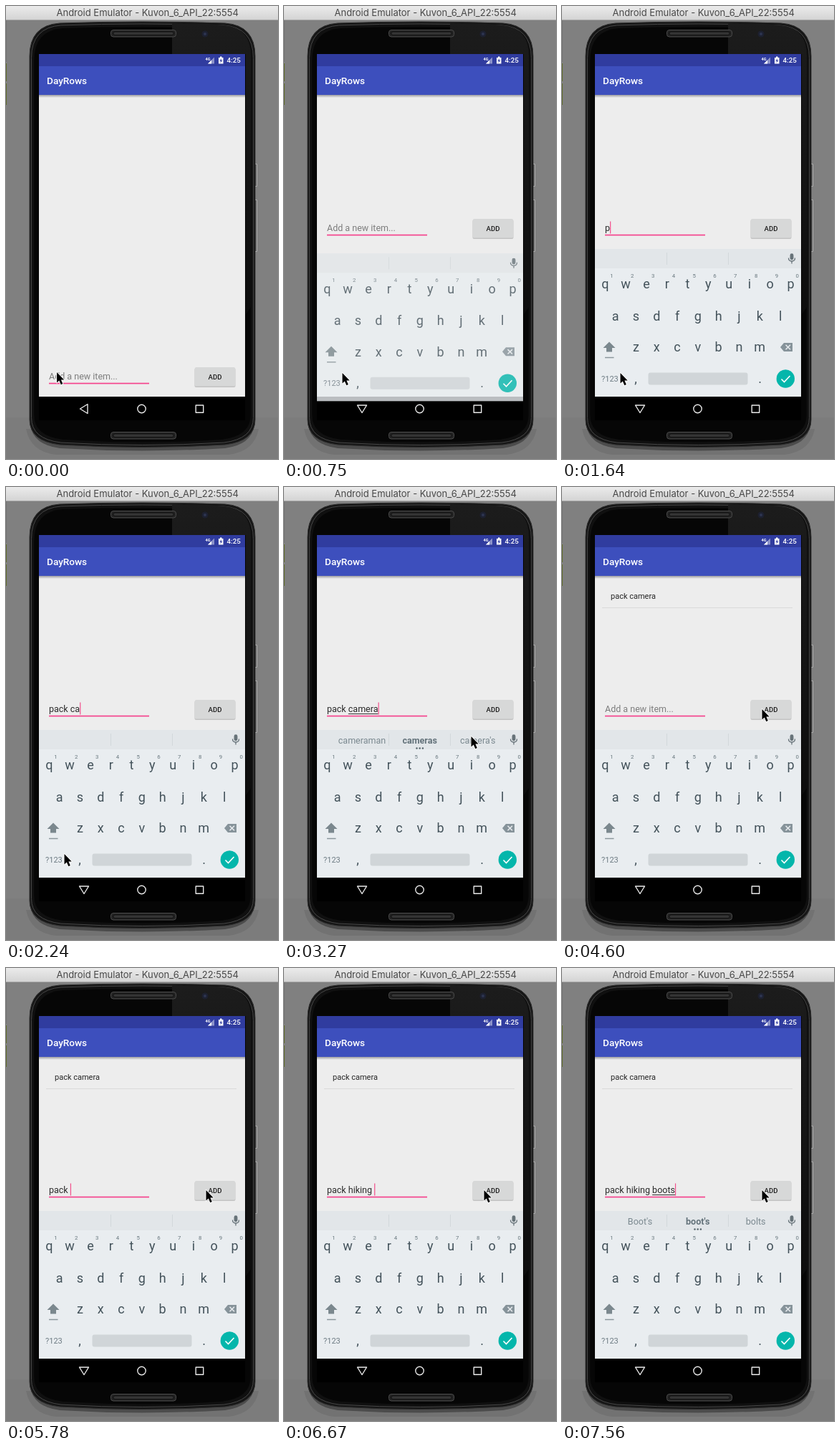
Animation of 380 by 632 pixels, one loop 8000 ms. Source, as an HTML page:

```html
<!DOCTYPE html>
<html lang="en">
<head>
<meta charset="utf-8">
<title>To-do list demo</title>
<style>
html, body { margin: 0; width: 100%; height: 100%; overflow: hidden; background: #808080; }
svg { display: block; width: 380px; height: 632px; font-family: Roboto, sans-serif; }
.window { font: 13px Inter, sans-serif; fill: #484848; }
.title { font-size: 13.6px; font-weight: 500; fill: #fff; }
.field { font-size: 12.5px; fill: #2b2b2b; }
.hint { fill: #7e7e7e; }
.add { font-size: 9.6px; font-weight: 500; fill: #1d1d1d; text-anchor: middle; }
.item { font-size: 11px; fill: #262626; }
.key { font-size: 18px; fill: #43525a; text-anchor: middle; }
.digit { font-size: 7.8px; fill: #66757c; text-anchor: middle; }
.word { font-size: 12.5px; fill: #7a888f; text-anchor: middle; }
.best { font-weight: 700; fill: #63727a; }
.nav { fill: none; stroke: #e8e8e8; stroke-width: 1.4; stroke-linejoin: round; }
.inset { transform-box: fill-box; transform-origin: center; }
</style>
</head>
<body>
<svg viewBox="0 0 380 632">
  <defs>
    <linearGradient id="bar" x2="0" y2="1">
      <stop stop-color="#ebebeb"/><stop offset="1" stop-color="#d4d4d4"/>
    </linearGradient>
    <linearGradient id="drop" x2="0" y2="1">
      <stop stop-color="#9c9ca0"/><stop offset="1" stop-color="#ededed"/>
    </linearGradient>
    <linearGradient id="gloss" x2="0" y2="1">
      <stop stop-color="#1c1c1c"/><stop offset="1" stop-color="#0d0d0d"/>
    </linearGradient>
    <path id="body" d="M33 70Q33 27 75 24Q190 20 306 24Q348 27 348 70V577Q348 607 306 612Q190 619 75 612Q33 607 33 577Z"/>
    <g id="speaker">
      <rect x="146.5" y="33.500" width="91" height="9.500" rx="3.500" fill="#222" stroke="#4b4b4b"/>
      <rect x="150" y="36" width="84" height="4.500" rx="2" fill="#343434" stroke="#111"/>
    </g>
  </defs>

  <!-- desktop and device -->
  <rect width="380" height="632" fill="#808080"/>
  <path d="M0 574H380V632H0Z" fill="#7c7c7c"/>
  <path d="M28 590Q34 622 70 626H310Q347 622 353 590Z" fill="#727272"/>
  <path d="M34 585Q38 612 75 617Q190 624 306 617Q343 612 347 585Z" fill="#4c4c4c"/>
  <path d="M.5 19V78" stroke="#707070"/>
  <path d="M.5 80V105M.5 108V138" stroke="#5d6a2a"/>
  <rect width="380" height="19" fill="url(#bar)"/>
  <path d="M0 19.500H380" stroke="#a5a5a5"/>
  <text class="window" x="70.500" y="14">Android Emulator - Kuvon_6_API_22:5554</text>
  <path d="M348 220.500H350.500V251.500H348M348 270.500H350.500V342.500H348" fill="#5a5a5a" stroke="#b0b0b0"/>
  <use href="#body" fill="#161616" stroke="#2b2b2b"/>
  <use href="#body" class="inset" fill="#101010" stroke="#484848" transform="scale(.984 .99)"/>
  <use href="#body" class="inset" fill="#060606" transform="scale(.96 .976)"/>
  <path d="M232 25Q280 24 306 27Q342 31 342 70V420L335 430V67H232Z" fill="url(#gloss)"/>
  <use href="#speaker"/>
  <use href="#speaker" y="561"/>
  <circle cx="278" cy="39" r="4.500" fill="#1d2130"/>
  <circle cx="278" cy="39" r="2" fill="#2d3450"/>

  <!-- app -->
  <rect x="46" y="67" width="288" height="511" fill="#000"/>
  <rect x="46" y="67" width="288" height="478" fill="#ededed"/>
  <rect x="46" y="67" width="288" height="17" fill="#303c9f"/>
  <rect x="46" y="84" width="288" height="40" fill="#3d4fbd"/>
  <rect x="46" y="124" width="288" height="4" fill="url(#drop)"/>
  <g fill="#fff">
    <text x="278.500" y="76" font-size="5.500" font-weight="700">4G</text>
    <path d="M282 80.500L291 71.500V80.500Z" opacity=".45"/>
    <path d="M282 80.500L287 75.500V80.500Z"/>
    <path d="M297 72H299V70.500H301.500V72H303.500V80.500H297Z"/>
    <path d="M301.200 73L298.300 76.700H300.100L299.500 79.500L302.400 75.700H300.600Z" fill="#303c9f"/>
    <text x="308.500" y="79.300" font-size="9.800" font-weight="500">4:25</text>
  </g>
  <text class="title" x="57" y="109">DayRows</text>
  <g id="item">
    <text class="item" x="68" y="156">pack camera</text>
    <path d="M56 168.500H322" stroke="#d9d9d9"/>
  </g>
  <g id="entry">
    <text id="field" class="field" x="60" y="521"></text>
    <path id="underline" stroke="#333" stroke-width="1"/>
    <rect id="caret" y="507.500" width="1.200" height="17" fill="#f2508c"/>
    <rect x="60" y="525.700" width="140" height="1.700" fill="#f4438c"/>
    <rect x="263.500" y="505" width="57" height="27" rx="2" fill="#c3c3c3"/>
    <rect id="button" x="264" y="504" width="56" height="26.500" rx="1.500"/>
    <text class="add" x="292" y="521">ADD</text>
  </g>

  <g class="nav">
    <path id="back"/>
    <circle cx="189.500" cy="562" r="5.700"/>
    <rect x="265.200" y="557" width="10.500" height="10.300"/>
  </g>

  <!-- soft keyboard -->
  <g id="keyboard">
    <rect x="46" y="339" width="288" height="206" fill="#e9edf0"/>
    <rect x="46" y="339" width="288" height="27" fill="#e2e6e9"/>
    <path d="M146.500 344V361M232.500 344V361" stroke="#d2d8db"/>
    <g fill="none" stroke="#667278" stroke-width="1.300">
      <rect x="319.200" y="346" width="3.600" height="7.500" rx="1.800" fill="#667278"/>
      <path d="M316.500 351.500Q316.500 356 321 356T325.500 351.500M321 356V359.500"/>
    </g>
    <g id="words"></g>
    <g id="dots" fill="#55636a">
      <circle cx="185.500" cy="364.500" r="1.200"/><circle cx="189.700" cy="364.500" r="1.200"/><circle cx="193.900" cy="364.500" r="1.200"/>
    </g>
    <g id="keys"></g>
    <path d="M66 468.500L74.500 477H70V482.500H62V477H57.500Z" fill="#7b888e"/>
    <path d="M60 490.500H72.500" stroke="#8b979c" stroke-width="1.500"/>
    <path d="M305 476L310 470H322V482H310Z" fill="#86939a"/>
    <path d="M312.500 472.800L319 479.200M319 472.800L312.500 479.200" stroke="#e9edf0" stroke-width="1.500"/>
    <text x="55" y="523.800" font-size="11" fill="#6e7c84">?123</text>
    <rect x="120.500" y="511.500" width="139" height="17" rx="3" fill="#d0d5d8"/>
    <circle cx="312.300" cy="520" r="12.700" fill="#04b6ab"/>
    <path d="M306.500 520.500L310.500 524.500L318.500 516" fill="none" stroke="#fff" stroke-width="1.600"/>
  </g>

  <path id="pointer" d="M0 0V14.500L3.300 11.500L5.800 17.200L8.300 16.100L5.900 10.600H10.200Z" fill="#000" stroke="#fff" stroke-width="1.800" stroke-linejoin="round" paint-order="stroke"/>
</svg>
<script>
const LOOP = 8000;
const $ = id => document.getElementById(id);

function addText(parent, cls, x, y, content) {
  const node = document.createElementNS("http://www.w3.org/2000/svg", "text");
  node.setAttribute("class", cls);
  node.setAttribute("x", x);
  node.setAttribute("y", y);
  node.textContent = content;
  parent.append(node);
  return node;
}

const PITCH = 28.8;
[["qwertyuiop", 60.3, 394.3], ["asdfghjkl", 74.7, 438.6], ["zxcvbnm", 103.4, 482.4]].forEach(([row, x, y]) =>
  [...row].forEach((letter, i) => addText($("keys"), "key", x + i * PITCH, y, letter)));
[..."1234567890"].forEach((digit, i) => addText($("keys"), "digit", 69.5 + i * PITCH, 378.5, digit));
addText($("keys"), "key", 103, 526, ",");
addText($("keys"), "key", 276.5, 526, ".");

const words = [109, 189.7, 270.7].map((x, i) => addText($("words"), i === 1 ? "word best" : "word", x, 357.5, ""));

const IDLE = {
  pointer: [71, 511], open: false, lift: 0, fade: 0, text: "", caret: false,
  words: [], item: false, pressed: false
};
const PACK = ["Pack", "pack", "packed"];
const typed = (text, suggestions = []) => ({ text, caret: true, words: suggestions });
const at = (x, y) => ({ pointer: [x, y] });

// Each step changes part of the state and holds until the next one.
const STEPS = [
  [0, {}],
  [150, { ...at(81.5, 512), caret: true }],
  [600, { open: true, lift: 17, fade: .4, caret: false }],
  [750, { lift: 6.3, fade: .8 }],
  [900, { lift: 1, fade: .97 }],
  [1050, { lift: 0, fade: 1, caret: true }],
  [1640, typed("p")],
  [1790, typed("pac")],
  [1940, typed("pack", PACK)],
  [2090, typed("pack ")],
  [2240, typed("pack ca")],
  [2390, typed("pack cam")],
  [2530, typed("pack came")],
  [2680, typed("pack camera")],
  [2820, { ...typed("pack camera", ["cameraman", "cameras", "camera's"]), ...at(88, 505) }],
  [2970, at(135, 455)],
  [3120, at(215, 388)],
  [3270, at(261.5, 348)],
  [3420, at(281, 318)],
  [3560, at(290, 297)],
  [3710, at(284, 305)],
  [3860, at(279.5, 310)],
  [4010, { pressed: true }],
  [4160, { ...typed(""), item: true }],
  [4450, { pressed: false }],
  [4600, { caret: false }],
  [5050, typed("p")],
  [5190, typed("pac")],
  [5340, typed("pack", PACK)],
  [5640, typed("pack ", PACK)],
  [5780, typed("pack ")],
  [5930, typed("pack h")],
  [6080, typed("pack hi")],
  [6230, typed("pack hik")],
  [6370, typed("pack hikin")],
  [6520, typed("pack hiking", ["Hiking", "hiking", "hikings"])],
  [6670, typed("pack hiking ")],
  [6820, typed("pack hiking b")],
  [6970, typed("pack hiking bo")],
  [7120, typed("pack hiking boo")],
  [7260, typed("pack hiking boot")],
  [7410, typed("pack hiking boots")],
  [7560, typed("pack hiking boots", ["Boot's", "boot's", "bolts"])]
];
let last = IDLE;
const states = STEPS.map(([time, change]) => ({ time, state: last = { ...last, ...change } }));

const show = (id, visible) => $(id).setAttribute("visibility", visible ? "visible" : "hidden");

function measure(text) {
  $("field").textContent = text.replace(/ /g, "\u00a0");
  return text ? $("field").getComputedTextLength() : 0;
}

function render(s) {
  const wordStart = measure(s.text.slice(0, s.text.lastIndexOf(" ") + 1));
  const end = measure(s.text);
  if (!s.text) $("field").textContent = "Add a new item...";
  $("field").setAttribute("class", s.text ? "field" : "field hint");

  const composing = s.words.length > 0;
  $("underline").setAttribute("d", composing && wordStart < end ? `M${60 + wordStart} 523.5H${60 + end}` : "");
  $("caret").setAttribute("x", 60 + end);
  show("caret", s.caret);
  words.forEach((node, i) => node.textContent = s.words[i] || "");
  show("dots", composing);

  show("item", s.item);
  $("button").setAttribute("fill", s.pressed ? "#c6c7c7" : "#d7d8d8");
  $("entry").setAttribute("transform", `translate(0 ${s.open ? -207 : 0})`);
  $("keyboard").setAttribute("transform", `translate(0 ${s.lift})`);
  $("keyboard").setAttribute("opacity", s.fade);
  $("back").setAttribute("d", s.open ? "M102.500 557H115.500L109 567.500Z" : "M114 555.500V568.500L103.500 562Z");
  $("pointer").setAttribute("transform", `translate(${s.pointer})`);
}

const start = performance.now();
let shown = null;
function tick() {
  const time = (performance.now() - start) % LOOP;
  const { state } = states.findLast(step => step.time <= time);
  if (state !== shown) render(shown = state);
  requestAnimationFrame(tick);
}
tick();
</script>
</body>
</html>
```
